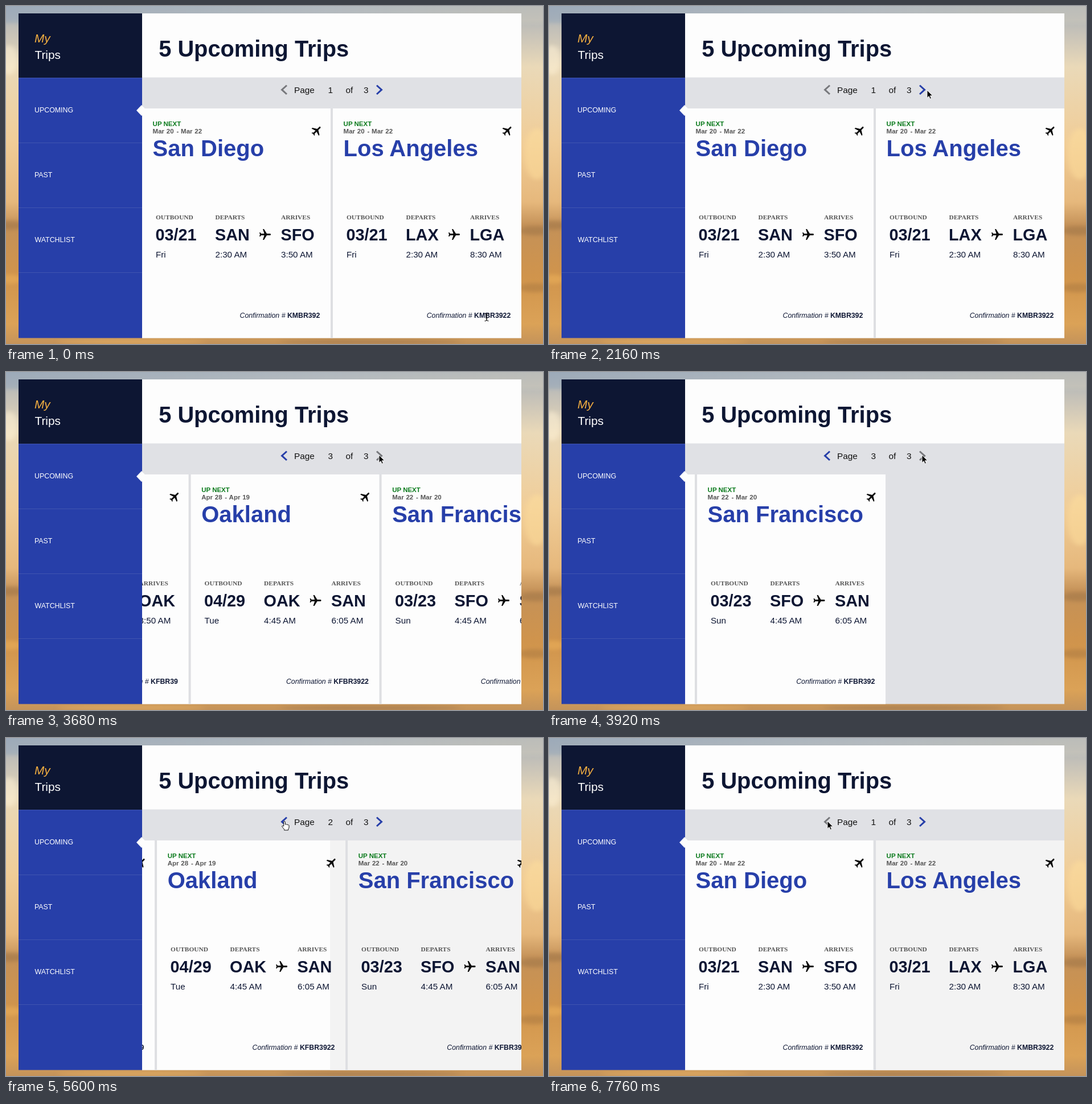
Write an HTML page that moves like this. It is 943 px wide and 594 px high and loops after 7840 ms.

```html
<!DOCTYPE html>
<html lang="en">
<head>
<meta charset="utf-8">
<title>My Trips</title>
<style>
  html, body { margin: 0; width: 100%; height: 100%; overflow: hidden; }
  svg { display: block; width: 943px; height: 594px; font-family: "Liberation Sans", Arial, sans-serif; fill: #0d1633; }
  text { white-space: pre; }
  .nav { font-size: 12.4px; fill: #fff; }
  .page { font-size: 15.3px; fill: #111; }
  .next { font: bold 11.5px "Liberation Sans", sans-serif; fill: #0a7a1c; }
  .dates { font: bold 11.5px "Liberation Sans", sans-serif; fill: #555; word-spacing: .6px; }
  .city { font: bold 40px "Liberation Sans", sans-serif; fill: #273fa9; }
  .label { font: bold 11.4px "Liberation Serif", serif; fill: #555; }
  .big { font: bold 28.8px "Liberation Sans", sans-serif; }
  .small { font-size: 15.2px; }
  .code { font-size: 12.3px; text-anchor: end; }
  .chevron { fill: none; stroke-width: 3; }
</style>
</head>
<body>
<svg viewBox="0 0 943 594">
  <defs>
    <linearGradient id="sky" x2="0" y2="1">
      <stop offset="0" stop-color="#a9b1ba"/>
      <stop offset=".07" stop-color="#c3c0b8"/>
      <stop offset=".18" stop-color="#ead9b8"/>
      <stop offset=".4" stop-color="#f0cd98"/>
      <stop offset=".58" stop-color="#e6b87c"/>
      <stop offset=".65" stop-color="#c49158"/>
      <stop offset=".8" stop-color="#d0944c"/>
      <stop offset=".94" stop-color="#dba257"/>
      <stop offset="1" stop-color="#c4935a"/>
    </linearGradient>
    <linearGradient id="haze">
      <stop offset="0" stop-color="#8fa3b8"/>
      <stop offset=".6" stop-color="#b9c0c4"/>
      <stop offset="1" stop-color="#cfc9b8"/>
    </linearGradient>
    <filter id="soft" x="-50%" y="-50%" width="200%" height="200%"><feGaussianBlur stdDeviation="5 3"/></filter>
    <clipPath id="deckArea"><rect x="239" y="180" width="666" height="403.500"/></clipPath>
    <path id="plane" transform="translate(-11.5 -12)" d="M21 16v-2l-8-5V3.500c0-.83-.67-1.500-1.500-1.500S10 2.670 10 3.500V9l-8 5v2l8-2.500V19l-2 1.500V22l3.500-1 3.500 1v-1.500L13 19v-5.500l8 2.500z" fill="#0a0a0a"/>
  </defs>

  <rect width="943" height="594" fill="url(#sky)"/>
  <g filter="url(#soft)" opacity=".5">
    <rect x="-20" y="-10" width="983" height="40" fill="url(#haze)"/>
    <ellipse cx="5" cy="95" rx="16" ry="26" fill="#fff3d8"/>
    <ellipse cx="932" cy="260" rx="22" ry="45" fill="#ffdf9c"/>
    <ellipse cx="8" cy="385" rx="28" ry="8" fill="#9a7144"/>
    <ellipse cx="930" cy="395" rx="30" ry="8" fill="#9a7144"/>
    <ellipse cx="6" cy="480" rx="24" ry="8" fill="#efb45c"/>
    <ellipse cx="928" cy="495" rx="28" ry="8" fill="#a8773f"/>
    <ellipse cx="220" cy="590" rx="130" ry="4" fill="#efb866"/>
    <ellipse cx="640" cy="590" rx="160" ry="4" fill="#967048"/>
  </g>

  <rect x="239" y="13" width="666" height="570.500" fill="#e0e1e5"/>
  <rect x="239" y="13" width="666" height="112.500" fill="#fdfdfd"/>
  <text x="268.200" y="89" font-size="39.800" font-weight="bold">5 Upcoming Trips</text>

  <g clip-path="url(#deckArea)">
    <rect id="paper" y="180" width="1671" height="404" fill="#fdfdfd"/>
    <rect id="tint" x="569" y="180" height="404" fill="#f3f3f3"/>
    <g id="deck"></g>
  </g>

  <polyline id="prev" class="chevron" points="493,139.500 484.500,147.200 493,155"/>
  <polyline id="next" class="chevron" points="651,139.500 659.500,147.200 651,155"/>
  <g class="page">
    <text x="506" y="153">Page</text><text id="number" x="565.500" y="153">1</text>
    <text x="596.500" y="153">of</text><text x="628" y="153">3</text>
  </g>

  <rect x="22" y="13" width="217" height="570.500" fill="#273fa9"/>
  <rect x="22" y="13" width="217" height="113" fill="#0d1633"/>
  <path d="M22 126.500H239M22 240.500H239M22 354.500H239M22 468.500H239" stroke="#4055b0"/>
  <path d="M229 183.500l9-9.500 9 9.500-9 9.500z" fill="#fdfdfd"/>
  <text x="50" y="64" font-size="20.800" font-style="italic" fill="#f5b041">My</text>
  <text x="50.500" y="93" font-size="20.800" fill="#fff">Trips</text>
  <g class="nav">
    <text x="50" y="187">UPCOMING</text><text x="50" y="301">PAST</text><text x="50.500" y="415">WATCHLIST</text>
  </g>

  <g id="cursor">
    <path id="beam" d="M-3.500-6.500Q0-6.500 0-4Q0-6.500 3.500-6.500M0-4V4M-3.500 6.500Q0 6.500 0 4Q0 6.500 3.500 6.500M-1.500 2H1.500" fill="none" stroke="#111" stroke-width="1.200"/>
    <path id="arrow" d="M0 0V13.500L3.100 10.600L5.200 15.300L7.400 14.300L5.300 9.800H9.600Z" fill="#000" stroke="#fff" stroke-width=".9"/>
    <path id="hand" d="M-1.300 1.200Q0-.6 1.300 1.200V6Q2.400 4.800 3.600 6.200Q4.800 5.300 6 6.800Q7.300 6.100 8 7.600V11Q7.800 13 6.600 14V16H-.5V14.300Q-3 11.500-4.600 9Q-4 7-1.300 9Z" fill="#fff" stroke="#111" stroke-width="1"/>
  </g>
</svg>
<script>
const LOOP = 7840, STEP = 80, PITCH = 335, LEFT = 239;
const SLIDE = 500;
const clicks = [
  { at: 2697, from: 1, to: 2 }, { at: 3473, from: 2, to: 3 },
  { at: 5337, from: 3, to: 2 }, { at: 6007, from: 2, to: 1 }
];
const trips = [
  { city: "San Diego", dates: "Mar 20 - Mar 22", day: ["03/21", "Fri"], dep: ["SAN", "2:30 AM"], arr: ["SFO", "3:50 AM"], x: 244, code: "KMBR392" },
  { city: "Los Angeles", dates: "Mar 20 - Mar 22", day: ["03/21", "Fri"], dep: ["LAX", "2:30 AM"], arr: ["LGA", "8:30 AM"], x: 241, code: "KMBR3922" },
  { city: "San Diego", dates: "Apr 19 - Apr 28", day: ["04/20", "Sun"], dep: ["SAN", "2:30 AM"], arr: ["OAK", "3:50 AM"], x: 244, code: "KFBR39" },
  { city: "Oakland", dates: "Apr 28 - Apr 19", day: ["04/29", "Tue"], dep: ["OAK", "4:45 AM"], arr: ["SAN", "6:05 AM"], x: 247, code: "KFBR3922" },
  { city: "San Francisco", dates: "Mar 22 - Mar 20", day: ["03/23", "Sun"], dep: ["SFO", "4:45 AM"], arr: ["SAN", "6:05 AM"], x: 242.5, code: "KFBR392" }
];
// Pointer keyframes: time, x, y
const route = [
  [0, 844, 547], [1200, 844, 547], [1360, 840, 488], [1440, 837, 462], [1680, 795, 347],
  [1920, 708, 193], [2120, 664, 148], [2240, 664, 148], [2400, 655, 146],
  [4300, 655, 146], [4900, 489, 146], [LOOP, 489, 146]
];

const $ = id => document.getElementById(id);
const text = (cls, x, y, s) => `<text class="${cls}" x="${x}" y="${y}">${s}</text>`;
const column = (x, label, [big, small]) =>
  text("label", x, 375, label) + text("big", x - 0.5, 412, big) + text("small", x, 442, small);

function card(trip, i) {
  const divider = i < trips.length - 1 ? `<rect x="331" y="180" width="4" height="404" fill="#dedfe2"/>` : "";
  const dates = trip.dates.replace(" - ", ` <tspan dx="1">-</tspan> `);
  return `<g transform="translate(${i * PITCH})">${divider}` +
    text("next", 18.6, 211, "UP NEXT") + text("dates", 18.6, 224, dates) + text("city", 18.6, 264, trip.city) +
    `<use href="#plane" transform="translate(306.5 219) rotate(45) scale(.93)"/>` +
    column(24, "OUTBOUND", trip.day) + column(128.5, "DEPARTS", trip.dep) + column(trip.x, "ARRIVES", trip.arr) +
    `<use href="#plane" transform="translate(${trip.x - 28} 401.5) rotate(90)"/>` +
    `<text class="code" x="312.3" y="547.5"><tspan font-style="italic">Confirmation # </tspan><tspan font-weight="bold">${trip.code}</tspan></text></g>`;
}
$("deck").innerHTML = trips.map(card).join("");

const clamp = v => Math.min(1, Math.max(0, v));
const ease = v => v * v * (3 - 2 * v);
const show = (id, on) => $(id).setAttribute("visibility", on ? "visible" : "hidden");

function pointer(t) {
  const i = route.findIndex(k => k[0] > t);
  const [a, b] = [route[i - 1], route[i]];
  const f = (t - a[0]) / (b[0] - a[0]);
  return [a[1] + (b[1] - a[1]) * f, a[2] + (b[2] - a[2]) * f];
}

function draw(t) {
  const click = clicks.filter(c => c.at <= t).pop();
  const page = click ? click.to : 1;
  const position = click ? click.from + (click.to - click.from) * ease(clamp((t - click.at) / SLIDE)) : 1;
  const x = LEFT - (position - 1) * 2 * PITCH;
  $("paper").setAttribute("x", x);
  $("deck").setAttribute("transform", `translate(${x})`);
  $("tint").setAttribute("width", t < clicks[2].at ? 0 : Math.max(0, Math.min(905, x + 1671) - 569));

  $("number").textContent = page;
  $("prev").setAttribute("stroke", page > 1 ? "#273fa9" : "#77787c");
  $("next").setAttribute("stroke", page < 3 ? "#273fa9" : "#77787c");

  const [px, py] = pointer(t);
  const overNext = py < 160 && Math.abs(px - 655) < 7 && page < 3;
  const overPrev = py < 160 && Math.abs(px - 489) < 7 && page > 1;
  const hand = overNext || overPrev;
  const beam = py > 535;
  $("cursor").setAttribute("transform", `translate(${px} ${py})`);
  show("hand", hand);
  show("beam", beam);
  show("arrow", !hand && !beam);
}

const start = performance.now();
function tick() {
  const t = (performance.now() - start) % LOOP;
  draw(Math.floor(t / STEP) * STEP);
  requestAnimationFrame(tick);
}
tick();
</script>
</body>
</html>
```
